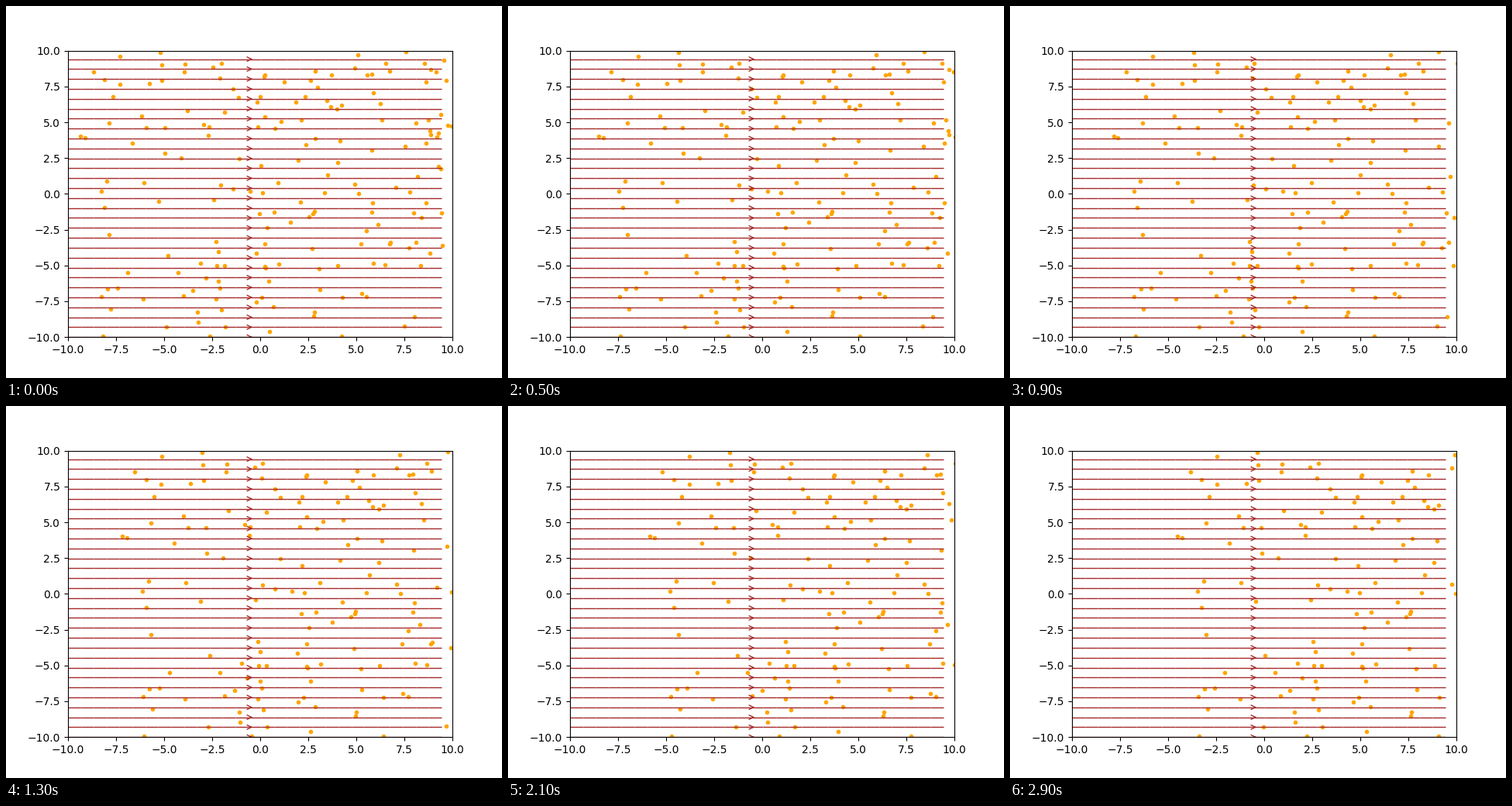
These frames come from a looping animation (640x480 px, 3 s). A matplotlib script:

```python
import numpy as np
import matplotlib.pyplot as plt
from matplotlib.animation import FuncAnimation
from matplotlib.collections import LineCollection
from matplotlib.patches import FancyArrowPatch

FRAMES = 30
INTERVAL = 100                  # ms
DRIFT = 1 / 6                   # data units per frame
PARTICLES = 180
CELL = 20 / 199                 # spacing of a 200-point grid over the axes
ROW_GAP = CELL * 200 / 29       # between streamlines
NODE_GAP = CELL * 200 / 30      # between nodes along a streamline

fig, ax = plt.subplots(figsize=(6.4, 4.8), dpi=100)
ax.set_xlim(-10, 10)
ax.set_ylim(-10, 10)

rng = np.random.default_rng(4)
start_x = rng.uniform(-9.5, 10, PARTICLES)
start_y = rng.uniform(-10, 10, PARTICLES)
dots, = ax.plot(start_x, start_y, "o", color="orange", ms=3)

rows = -10 + ROW_GAP * np.arange(29)
nodes = -10 + NODE_GAP * np.arange(30)
segments = [[(a, y), (b, y)] for y in rows for a, b in zip(nodes, nodes[1:])]
ax.add_collection(LineCollection(segments, colors="brown", linewidths=1, zorder=2))

# Each arrow sits on the middle segment of its streamline.
tail, head = nodes[14], nodes[14:16].mean()
for y in rows:
    ax.add_patch(FancyArrowPatch((tail, y), (head, y), arrowstyle="->",
                                 mutation_scale=10, color="brown", lw=1, zorder=2))


def update(i):
    dots.set_data(start_x + DRIFT * i, start_y)
    return dots,


anim = FuncAnimation(fig, update, frames=FRAMES, interval=INTERVAL, repeat=True)
plt.show()
```
